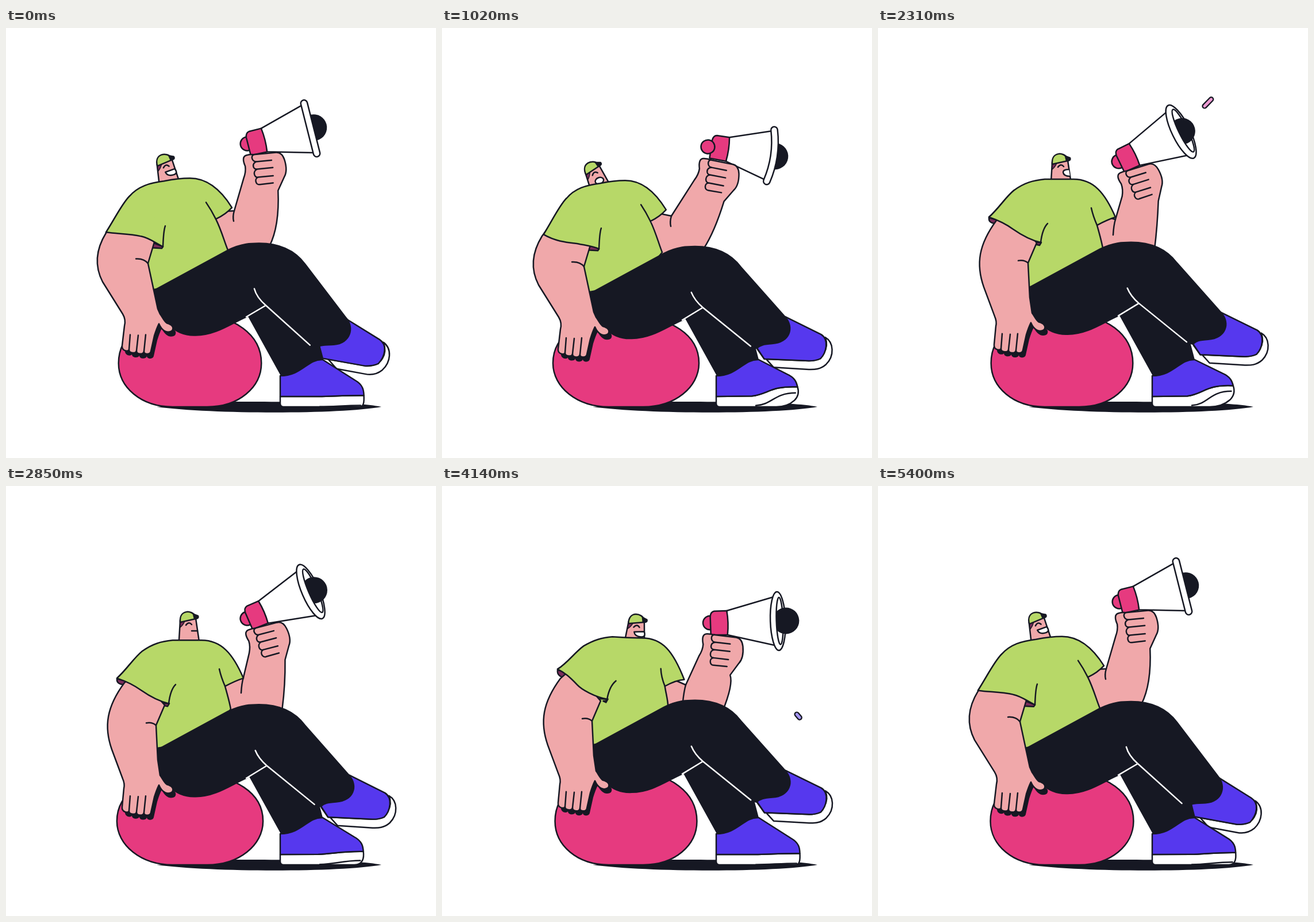
Recreate the animation shown at these times as an HTML page with a canvas. Size 748 px wide and 748 px high, loop 5430 ms.

```html
<!DOCTYPE html>
<html lang="en">
<head>
<meta charset="utf-8">
<title>Megaphone</title>
<style>
html, body { margin: 0; width: 100%; height: 100%; overflow: hidden; background: #fff; }
canvas { display: block; }
</style>
</head>
<body>
<canvas id="stage" width="748" height="748"></canvas>
<script>
const ctx = document.getElementById('stage').getContext('2d');
const LOOP = 5430, TAU = Math.PI * 2;
const INK = '#161823', SKIN = '#f0a8aa', GREEN = '#b7d868', PINK = '#e63a7f',
      BLUE = '#5638ee', PLUM = '#7b2d5b', WHITE = '#fff';

// lean, head x y turn, horn x y turn, bell opening, ball offset, sleeve droop,
// elbow x y, forearm control x y, forearm end x y
const poses = {
  raised:  [0, 283, 266, -10, 449, 195, -14.2, 0, 6, 0, 397, 318, 476, 345, 458, 380],
  lifted:  [0, 284, 265, -9, 448, 192, -15, 0, 6, 0, 397, 317, 476, 344, 458, 380],
  back:    [0, 275, 277, -21, 497, 211, 8.4, -6, 8, 9, 399, 327, 474, 355, 455, 384],
  upright: [1, 318, 266, 0, 446, 220, -26, 12, 2, 0, 413, 333, 486, 345, 481, 385],
  calling: [1, 318, 266, 0, 449, 219, -20.8, 11, 11, 0, 413, 333, 486, 345, 480, 390],
  forward: [1.42, 335, 270, 8, 496, 238, -2, 9, 14, 0, 424, 346, 507, 345, 488, 392],
  swung:   [0, 280, 274, -17, 491, 207, 11.5, -7, 8, 9, 399, 327, 474, 350, 457, 384]
};
const timeline = [
  [0, 'raised'], [300, 'lifted'], [590, 'raised'], [1020, 'back'], [1190, 'back'],
  [1700, 'upright'], [2310, 'upright'], [3390, 'calling'], [3900, 'calling'],
  [4140, 'forward'], [4190, 'forward'], [4600, 'swung'], [4690, 'swung'],
  [5140, 'raised'], [LOOP, 'raised']
];

// blends two path strings that share one structure
function mix(a, b, k) {
  const to = b.match(/-?[\d.]+/g);
  let i = 0;
  return a.replace(/-?[\d.]+/g, v => +v + (to[i++] - v) * k);
}

function draw(d, fill, line = INK, width = 2.5) {
  const path = new Path2D(d);
  if (fill) { ctx.fillStyle = fill; ctx.fill(path); }
  if (line) { ctx.strokeStyle = line; ctx.lineWidth = width; ctx.stroke(path); }
}

function ellipse(x, y, rx, ry, fill, line = INK) {
  ctx.beginPath();
  ctx.ellipse(x, y, rx, ry, 0, 0, TAU);
  ctx.fillStyle = fill; ctx.fill();
  if (line) { ctx.strokeStyle = line; ctx.lineWidth = 2.5; ctx.stroke(); }
}

function group(x, y, turn, body) {
  ctx.save();
  ctx.translate(x, y);
  ctx.rotate(turn * Math.PI / 180);
  body();
  ctx.restore();
}

function poseAt(t) {
  let i = 0;
  while (t >= timeline[i + 1][0]) i++;
  const [t0, from] = timeline[i], [t1, to] = timeline[i + 1];
  const p = (t - t0) / (t1 - t0), e = p * p * (3 - 2 * p);
  return poses[from].map((v, n) => v + (poses[to][n] - v) * e);
}

function head(x, y, turn, t) {
  group(x, y, turn, () => {
    ctx.translate(-318, -266);
    draw('M300,284 L303,234 L330,230 L338,284', SKIN);
    draw('M303,237 L311,235 Q308,242 303,246Z', PLUM, INK, 1.5);
    draw('M303,237 C301,214 324,216 329,226 L330,231Z', GREEN);
    draw('M326,223 L334,226 Q336,231 328,231Z', INK);
    draw('M313,242 Q318,235 323,241');
    if (t > 850 && t < 1300) ellipse(321, 255, 7.5, 5.5, WHITE);
    else if (t > 2100 && t < 2850) draw('M332,246 Q322,246 322,251 Q323,258 334,258', WHITE);
    else if (t >= 1300 && t < 3950) draw('M323,252 L333,252');
    else draw('M315,250 L332,247 Q337,256 328,257 Q317,258 315,250Z', WHITE);
  });
}

function megaphone(x, y, turn, open, offset) {
  const bow = Math.max(-open, 0);
  const rim = 83 + (bow ? -1.3 * bow : open * .6);
  const knob = () => ellipse(-30 - bow * .8, bow * .3 - 1, 12, 12, PINK);
  group(x, y, turn, () => {
    if (open <= 0) ellipse(rim + offset, 0, 23, 23, INK, null);
    draw(`M0,-21 L${rim - 3},-43 Q${rim - 3 + 2 * bow},0 ${rim - 3},43 L0,21Z`, WHITE);
    if (open <= 0) {
      const edge = `M${rim},-45 Q${rim + 2 * bow},0 ${rim},45`;
      draw(edge, null, INK, 14);
      draw(edge, null, WHITE, 9);
    } else {
      ellipse(rim, 0, 6 + open * .8, 51, WHITE);
      const inner = [rim + open * .35, 0, open * .65, 41];
      ellipse(...inner, WHITE);
      ctx.save();
      ctx.beginPath();
      ctx.ellipse(...inner, 0, 0, TAU);
      ctx.rect(inner[0], -60, 80, 120);
      ctx.clip();
      ellipse(rim + offset, 0, 23, 23, INK, null);
      ctx.restore();
    }
    if (!bow) knob();
    draw('M0,-21 L-22,-21 Q-28,-20 -29,-12 L-29,20 L0,21 Q3,0 0,-21Z', PINK);
    if (bow) knob();
  });
}

function raisedArm(x, y, turn, open, lean, ex, ey, cx, cy, rx, ry) {
  // the fist turns a little less than the horn, around the grip
  const rad = Math.PI / 180, a = turn * rad;
  turn += Math.min(open, 0);
  const c = Math.cos(turn * rad), s = Math.sin(turn * rad);
  x += 45 * (s - Math.sin(a));
  y += 45 * (Math.cos(a) - c);
  const at = (u, v) => `${x + u * c - v * s},${y + u * s + v * c} `;
  draw(`M365,320 L${ex},${ey} L${at(-51, 56)} Q${at(-44, 46)}${at(-43, 36)}` +
    `Q${at(-46, 18)}${at(-36, 18)} Q${at(-29, 18)}${at(-24, 20)} L${at(15, 26)}` +
    `Q${at(25, 28)}${at(26, 42)} Q${at(27, 62)}${at(18, 71)} L${at(2, 91)}` +
    `Q${cx},${cy} ${rx},${ry} L440,430 L365,400`, SKIN);
  draw(`M${ex},${ey} q-3,10 ${-1 - 3 * lean},${18 + 9 * lean}`);
  group(x, y, turn, () => draw('M-23,20 C-30,20 -30,32 -22,33 L4,37' +
    'M-22,33 C-31,34 -32,45 -24,46 L3,50 M-24,46 C-33,47 -33,60 -26,60 L0,64' +
    'M-26,60 C-34,61 -33,73 -26,73 L-3,76'));
}

function torso(k) {
  draw(mix('M174,355 C190,330 202,305 215,292 C230,275 250,269 275,266 C290,263 305,261 320,261 C355,261 378,288 393,312 Q382,324 365,332 C375,352 380,372 386,386 L340,440 L250,456 L232,409 L246,375 L273,380 C262,375 245,365 235,362 C215,357 195,358 174,355Z',
    'M193,330 C210,315 222,295 237,283 C255,270 270,266 290,264 C305,264 325,264 340,264 C375,264 395,288 413,330 Q400,334 381,344 C385,358 389,372 391,384 L340,440 L248,454 L244,410 L262,372 L283,374 C265,370 245,358 235,351 C220,340 208,335 193,330Z', k), GREEN);
  draw(mix('M348,303 Q357,316 365,332', 'M371,314 Q374,328 381,344', k));
  draw(mix('M255,373 L273,380 L271,383 L252,382Z', 'M276,374 L284,374 L281,379 L272,377Z', k), PLUM);
  draw(mix('M174,355 L178,356 L177,357 Q174,357 174,355', 'M193,331 L212,336 L204,341 Q192,340 193,331', k), PLUM);
}

function sleeve(k, droop) {
  draw(mix(`M215,292 C202,305 190,330 174,355 C195,${358 + droop} 215,${357 + droop * 1.3} 235,${362 + droop} C250,${365 + droop} 262,375 273,380 Q274,352 277,344`,
    'M237,283 C222,295 210,315 193,330 C208,335 220,340 235,351 C245,358 265,370 283,374 Q286,350 295,341', k), GREEN);
}

const hand = 'L202,552 C201,562 213,563 214,559 C214,566 226,566 227,561 C227,568 239,568 240,562 C240,568 251,568 252,562 L258,535 Q262,522 266,514 C272,528 282,531 289,526 C293,520 288,515 280,513 C275,510 272,502 268,497 ';

function restingArm(k) {
  group(5, 8, 0, () => draw('M206,530 ' + hand + 'Z', INK, null));
  draw(mix('M182,345 L174,356 C158,382 152,410 168,441 L203,497 Q209,507 206,518 ' + hand + 'L264,488 L247,409 L258,372 L230,345Z',
    'M215,328 L206,336 C175,378 170,412 184,452 L203,503 Q207,512 205,520 ' + hand + 'L264,470 L261,410 L276,375 L250,345Z', k), SKIN);
  draw('M216,533 L214,559 M230,534 L227,561 M243,533 L240,562');
  draw(mix('M226,401 Q240,400 247,409', 'M244,406 Q254,404 261,410', k));
}

function ball(dy) {
  const l = 196 - dy * .5, r = 444 + dy * .5, top = 497 + dy * .6;
  draw(`M${l},583 C${l},625 235,659 290,659 L350,659 C405,659 ${r},625 ${r},583` +
    `C${r},535 400,${top} 320,${top} C240,${top} ${l},535 ${l},583Z`, PINK);
}

function frontShoe(up) {
  draw(mix('M477,641 L545,641 C570,641 590,641 623,641 C623,646 623,650 623,653 C623,657 621,659 617,659 L545,659 L483,659 Q477,659 477,653Z',
    'M477,641 L537,640 C566,636 566,616 617,619 C621,630 619,638 610,646 C600,654 585,659 570,659 L545,659 L483,659 Q477,659 477,653Z', up), WHITE);
  draw(mix('M546,659 C572,659 590,659 617,659', 'M546,656 C575,654 574,627 614,627', up));
  draw(mix('M477,605 C515,605 525,575 551,577 L608,614 C622,622 623,632 623,641 C590,641 570,641 545,641 L477,641Z',
    'M477,605 C515,605 525,575 551,577 L597,598 C612,604 615,612 617,619 C566,616 566,636 537,640 L477,641Z', up), BLUE);
}

function swingShoe(s) {
  draw(mix('M547,560 L551,574 L627,587 C655,588 664,565 657,546 C672,557 670,580 655,594 C645,602 635,603 625,601 L575,592Z',
    'M549,552 L562,569 L640,571 C665,571 675,547 668,530 C683,538 685,562 670,577 C660,586 650,586 640,586 L577,583Z', s), WHITE);
  draw(mix('M590,504 L650,541 C664,550 660,570 648,583 C640,587 632,587 625,587 L551,574 L545,552 L560,530Z',
    'M598,495 L661,525 C675,534 670,557 660,567 C652,571 645,571 640,571 L562,569 L548,550 L565,525Z', s), BLUE);
}

function frontLeg(s) {
  const hips = 'M259,455 L386,386 C410,374 428,374 440,374 C480,374 505,390 520,410 ';
  const seat = 'L418,502 C392,513 365,534 330,534 C305,535 293,524 280,515 L264,497Z';
  draw(mix(hips + 'L592,504 C606,520 600,548 570,550 C558,551 550,550 545,553 L530,551 L452,482 ' + seat,
    hips + 'L598,496 C614,514 606,540 575,542 C560,543 553,545 548,551 L540,548 L454,480 ' + seat, s), INK);
  draw(mix('M432,453 Q436,468 452,482 L529,551 M418,502 L452,482',
    'M434,454 Q440,468 454,480 L538,547 M418,502 L454,480', s), null, WHITE);
}

function spark(t, start, x, y, dx, dy, color) {
  const p = (t - start) / 600;
  if (p <= 0 || p >= 1) return;
  const a = p * p, b = 1 - (1 - p) ** 2;
  const d = `M${x + dx * a},${y + dy * a} L${x + dx * b},${y + dy * b}`;
  draw(d, null, INK, 9.5);
  draw(d, null, color, 5);
}

function render() {
  const t = performance.now() % LOOP;
  const beat = t / (LOOP / 3);
  const dy = 2.5 + 4.7 * Math.cos(TAU * (beat - .68));
  const swing = .5 + .6 * Math.cos(TAU * (beat - .42));
  const tap = Math.abs(Math.sin(Math.PI * (t / (LOOP / 4) - .025)));
  const [lean, hx, hy, hr, x, y, turn, open, offset, droop, ...arm] = poseAt(t);

  // the shirt sinks with the bounce and narrows as the sleeve droops
  const shirt = body => group(275, dy * .7, 0, () => {
    ctx.scale(1 - droop * .003, 1);
    ctx.translate(-275, 0);
    body();
  });

  ctx.fillStyle = WHITE;
  ctx.fillRect(0, 0, 748, 748);
  ctx.lineCap = ctx.lineJoin = 'round';

  draw('M262,659 C360,672 580,672 653,659 C620,652 540,650 400,650Z', INK, null);
  ball(dy);
  megaphone(x, y, turn, open, offset);
  raisedArm(x, y, turn, open, lean, ...arm);
  head(hx, hy, hr, t);
  shirt(() => torso(lean));
  group(0, dy, 0, () => swingShoe(swing));
  draw('M410,482 L478,605 C515,605 525,575 551,577 L540,535 L470,470Z', INK, null);
  frontShoe(tap);
  group(0, dy, 0, () => {
    frontLeg(swing);
    restingArm(Math.min(lean, 1));
  });
  shirt(() => sleeve(lean, droop));

  spark(t, 2215, 567, 137, 43, -44, '#ee9bd3');
  spark(t, 3210, 585, 137, 37, -33, '#ee9bd3');
  spark(t, 4105, 617, 397, 44, 51, '#a596f3');
  requestAnimationFrame(render);
}
render();
</script>
</body>
</html>
```
